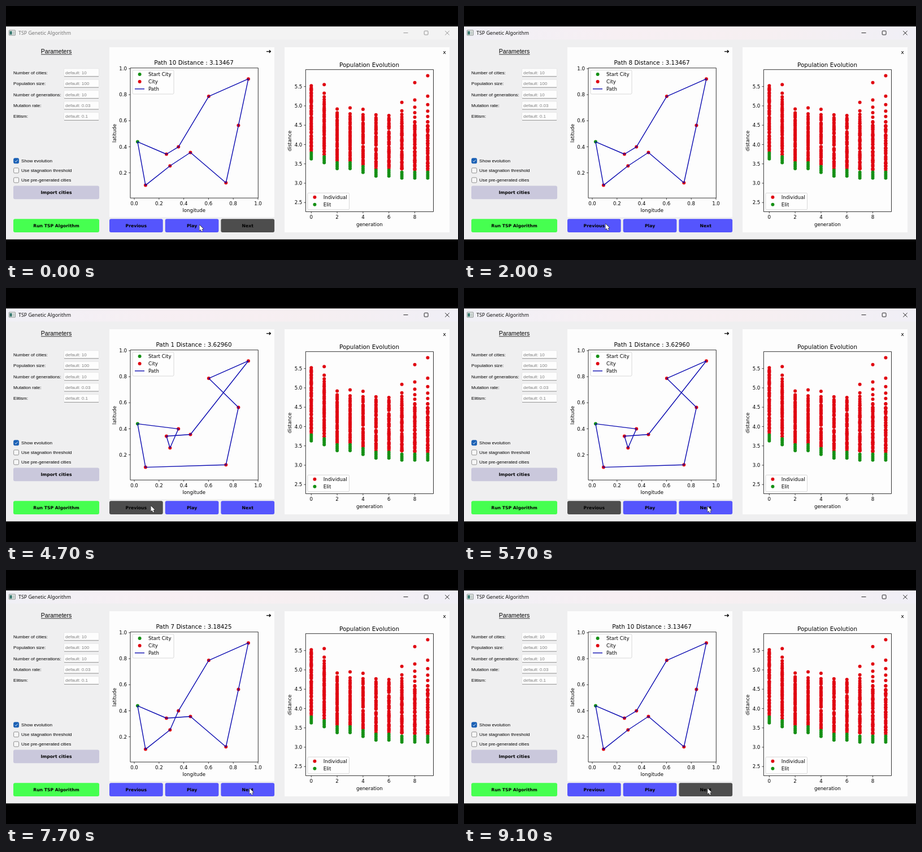
These frames come from a looping animation (800x450 px, 9.2 s). An HTML page with a canvas:

```html
<!DOCTYPE html>
<html lang="en">
<head>
<meta charset="utf-8">
<title>TSP Genetic Algorithm</title>
<style>
html, body { margin: 0; width: 100%; height: 100%; overflow: hidden; background: #000; }
canvas { display: block; width: 800px; height: 450px; }
</style>
</head>
<body>
<canvas id="stage"></canvas>
<script>
const canvas = document.getElementById('stage');
const ctx = canvas.getContext('2d');
const ratio = window.devicePixelRatio || 1;
canvas.width = 800 * ratio;
canvas.height = 450 * ratio;
ctx.scale(ratio, ratio);

const LOOP = 9200, STEP = 100;
const UI = '"Liberation Sans", Arial, sans-serif';
const TITLE = '"Noto Sans", "Open Sans", sans-serif';
const PLOT = '"DejaVu Sans", sans-serif';
const RED = '#e00612', GREEN = '#169016', BLUE = '#0a0ab0';

// One click per interval: nine times Previous, then nine times Next.
const BACK_AT = 1450, NEXT_AT = 6100, CLICK = 300, LAST_PATH = 10;

// Longitude and latitude; S is the start.
const cities = {
  S: [0.027, 0.438], A: [0.091, 0.104], B: [0.289, 0.253], C: [0.26, 0.343], D: [0.357, 0.399],
  E: [0.454, 0.356], F: [0.741, 0.123], G: [0.842, 0.564], H: [0.922, 0.921], I: [0.602, 0.787]
};
const tours = [
  ['SAFGIHECBD', 3.6296], ['SAFGIHDEBC', 3.53284], ['SCABDIHGFE', 3.37894],
  ['SAEFGHIDBC', 3.28041], ['SABDIHGFEC', 3.18425], ['SABEFGHIDC', 3.13467]
];
const bestOf = gen => tours[+'0122344555'[gen]];
const worst = [5.52, 5.55, 4.92, 4.95, 4.91, 4.77, 4.75, 5.09, 5.6, 5.78];

const lon = v => 227 + v * 219;
const lat = v => 341.6 - v * 230.6;
const genX = gen => 540.3 + gen * 22.9;
const distY = d => 142.7 + (5.5 - d) * 68.5;
const clamp = (v, lo, hi) => Math.min(hi, Math.max(lo, v));
const range = (from, to, step) =>
  Array.from({ length: Math.round((to - from) / step) + 1 }, (_, i) => from + i * step);

function makeRandom(seed) {
  return () => {
    seed = (seed * 16807) % 2147483647;
    return seed / 2147483647;
  };
}

function box(x, y, w, h, fill, stroke, radius = 0, width = 0.8) {
  ctx.beginPath();
  ctx.roundRect(x, y, w, h, radius);
  if (fill) { ctx.fillStyle = fill; ctx.fill(); }
  if (stroke) { ctx.strokeStyle = stroke; ctx.lineWidth = width; ctx.stroke(); }
}

function text(str, x, y, size, { font = UI, align = 'left', color = '#000', weight = '' } = {}) {
  ctx.font = `${weight} ${size}px ${font}`;
  ctx.textAlign = align;
  ctx.textBaseline = 'alphabetic';
  ctx.fillStyle = color;
  ctx.fillText(str, x, y);
}

function plotText(str, x, y, align = 'center', size = 8.6) {
  text(str, x, y, size, { font: PLOT, align });
}

function line(points, color, width, close) {
  ctx.beginPath();
  points.forEach(([x, y]) => ctx.lineTo(x, y));
  if (close) ctx.closePath();
  ctx.strokeStyle = color;
  ctx.lineWidth = width;
  ctx.lineJoin = 'round';
  ctx.stroke();
}

function dot(x, y, color) {
  ctx.beginPath();
  ctx.arc(x, y, 3, 0, Math.PI * 2);
  ctx.fillStyle = color;
  ctx.fill();
}

function button(label, x, y, w, color) {
  box(x, y, w, 23.6, color, null, 3);
  text(label, x + w / 2, y + 14.7, 7.7, { font: PLOT, align: 'center', weight: 'bold' });
}

function sideLabel(str, x, y) {
  ctx.save();
  ctx.translate(x, y);
  ctx.rotate(-Math.PI / 2);
  plotText(str, 0, 0);
  ctx.restore();
}

function axes(x, y, w, h, xTicks, yTicks) {
  box(x, y, w, h, null, '#000', 0, 0.8);
  for (const [label, tx] of xTicks) {
    line([[tx, y + h], [tx, y + h + 3]], '#000', 0.7);
    plotText(label, tx, y + h + 13);
  }
  for (const [label, ty] of yTicks) {
    line([[x - 3, ty], [x, ty]], '#000', 0.7);
    plotText(label, x - 6, ty + 3.2, 'right');
  }
}

// Entries are [label, colour]; the path entry is a line.
function legend(x, y, w, entries) {
  box(x, y, w, 3.7 + entries.length * 12.9, 'rgba(255,255,255,.8)', '#d0d0d0', 2);
  entries.forEach(([label, color], i) => {
    const cy = y + 7.5 + i * 12.9;
    if (color === BLUE) line([[x + 4, cy], [x + 21, cy]], color, 1.4);
    else dot(x + 12.6, cy, color);
    plotText(label, x + 28, cy + 3.1, 'left');
  });
}

function titleBar(active) {
  const ink = active ? '#111' : '#8b8b8b';
  const g = ctx.createLinearGradient(0, 0, 800, 0);
  const tints = active ? ['#f0f0f6', '#f7eff3', '#f6eff1', '#f0eff6'] : ['#f3f3f3'];
  tints.forEach((c, i) => g.addColorStop(i / 3, c));
  box(0, 36.5, 800, 23, g);
  box(5.4, 42.9, 11, 9, '#f4f6f5', '#6b7472', 0.5);
  box(6.6, 44.6, 4, 6, '#2f7268');
  box(11.6, 44.6, 3.6, 6, '#c3cdca');
  text('TSP Genetic Algorithm', 22, 51, 8.85, { font: TITLE, color: active ? '#111' : '#777' });
  line([[703.5, 47.6], [711.5, 47.6]], ink, 0.9);
  box(740.2, 44.2, 6.8, 6.8, null, ink, 1, 0.9);
  line([[777.2, 44.2], [784.6, 51.4]], ink, 0.9);
  line([[784.6, 44.2], [777.2, 51.4]], ink, 0.9);
}

function parameters() {
  text('Parameters', 89, 84, 10.5, { align: 'center' });
  line([[62, 85.8], [116.5, 85.8]], '#000', 0.8);
  const fields = {
    'Number of cities:': '10', 'Population size:': '100', 'Number of generations:': '10',
    'Mutation rate:': '0.03', 'Elitism:': '0.1'
  };
  Object.entries(fields).forEach(([label, value], i) => {
    const y = 117.8 + i * 19.4;
    text(label, 13, y + 2.9, 8.1);
    box(102.5, y - 7, 62, 14, '#fdfdfd', '#e2e2e2', 1.5);
    line([[103, y + 7], [164, y + 7]], '#8c8c8c', 0.9);
    text('default: ' + value, 105, y + 2.9, 8.1, { color: '#808080' });
  });
  ['Show evolution', 'Use stagnation threshold', 'Use pre-generated cities'].forEach((label, i) => {
    const y = 274.3 + i * 17.1;
    box(13.6, y - 4.5, 9, 9, i ? '#f7f7f7' : '#185fb4', i ? '#777' : '#185fb4', 1.8);
    if (!i) line([[15.8, y + 0.2], [17.5, y + 2], [20.6, y - 1.8]], '#fff', 0.9);
    text(label, 27, y + 2.9, 8.1);
  });
  button('Import cities', 13, 318.6, 152, '#cac8dc');
  button('Run TSP Algorithm', 13, 377.3, 152, '#46ff50');
}

function routePlot(path) {
  const [tour, length] = bestOf(path - 1);
  box(183, 73, 292, 301, '#fdfdfd');
  line([[461, 80.6], [468, 80.6]], '#000', 1.3);
  line([[465.8, 78.2], [468.4, 80.6], [465.8, 83]], '#000', 1.3);
  plotText(`Path ${path} Distance : ${length.toFixed(5)}`, 332.5, 103.8, 'center', 10.35);

  axes(220, 109.8, 226.3, 230.4,
    range(0, 1, 0.2).map(v => [v.toFixed(1), lon(v)]),
    range(0.2, 1, 0.2).map(v => [v.toFixed(1), lat(v)]));
  plotText('longitude', 332.7, 364.8);
  sideLabel('latitude', 194.6, 225.5);

  const place = key => [lon(cities[key][0]), lat(cities[key][1])];
  for (const key in cities) dot(...place(key), key === 'S' ? GREEN : RED);
  line([...tour].map(place), BLUE, 1.4, true);
  legend(224, 113.6, 73, [['Start City', GREEN], ['City', RED], ['Path', BLUE]]);
}

function populationPlot() {
  box(493, 73, 292, 328, '#fdfdfd');
  plotText('x', 776, 84.5, 'center', 9.5);
  plotText('Population Evolution', 643, 107.5, 'center', 10.35);

  // A thinning tail of poor tours, a crowded middle and the elite at the bottom.
  const random = makeRandom(4127);
  worst.forEach((far, gen) => {
    const x = genX(gen);
    const best = bestOf(gen)[1];
    const crowd = Math.max(4.6, 5.4 - 0.35 * gen);
    const low = best + 0.2;
    for (let i = 0; i < 5; i++) dot(x, distY(far + (crowd - far) * Math.sqrt(i / 5)), RED);
    const count = (crowd - low) * 36;
    for (let i = 0; i <= count; i++) {
      dot(x, distY(low + (crowd - low) * clamp((i + random() * 3 - 1.5) / count, 0, 1)), RED);
    }
    for (let i = 0; i < 4; i++) dot(x, distY(best + 0.05 * i), GREEN);
  });

  axes(530.3, 112.7, 226.2, 251.7,
    range(0, 8, 2).map(v => [String(v), genX(v)]),
    range(2.5, 5.5, 0.5).map(v => [v.toFixed(1), distY(v)]));
  plotText('generation', 643.3, 389.8);
  sideLabel('distance', 504.7, 239);
  legend(533.8, 331.3, 73.7, [['Individual', RED], ['Elit', GREEN]]);
}

function controls(path) {
  const enabled = [path > 1, true, path < LAST_PATH];
  ['Previous', 'Play', 'Next'].forEach((label, i) =>
    button(label, 183 + i * 98.7, 377.3, 94.7, enabled[i] ? '#5555fd' : '#4d4d4d'));
}

function pointer(t) {
  let x = 342.5, y = 388;
  const glide = (start, end, toX, toY) => {
    const p = clamp((t - start) / (end - start), 0, 1);
    const ease = p * p * (3 - 2 * p);
    x += (toX - x) * ease;
    y += (toY - y) * ease;
  };
  glide(400, 1000, 250.5, 386);
  glide(3900, 4100, 256.5, 386);
  glide(5000, 5700, 431.2, 387);
  ctx.save();
  ctx.translate(x, y);
  line([[0, 0], [0, 9.8], [2.2, 7.8], [3.8, 11.4], [5.5, 10.6], [4, 7.2], [7, 7]], '#222', 1.1, true);
  ctx.fillStyle = '#fff';
  ctx.fill();
  ctx.restore();
}

function pathAt(t) {
  const clicks = start => clamp(Math.floor((t - start) / CLICK) + 1, 0, LAST_PATH - 1);
  return LAST_PATH - clicks(BACK_AT) + clicks(NEXT_AT);
}

function draw(t) {
  const path = pathAt(t);
  box(0, 0, 800, 450, '#000');
  box(0, 36.5, 800, 377, '#efeff0');
  titleBar(t >= BACK_AT - CLICK);
  parameters();
  routePlot(path);
  populationPlot();
  controls(path);
  pointer(t);
}

let last = -1;
function tick() {
  const t = Math.floor(performance.now() % LOOP / STEP) * STEP;
  if (t !== last) draw(last = t);
  requestAnimationFrame(tick);
}
tick();
</script>
</body>
</html>
```
